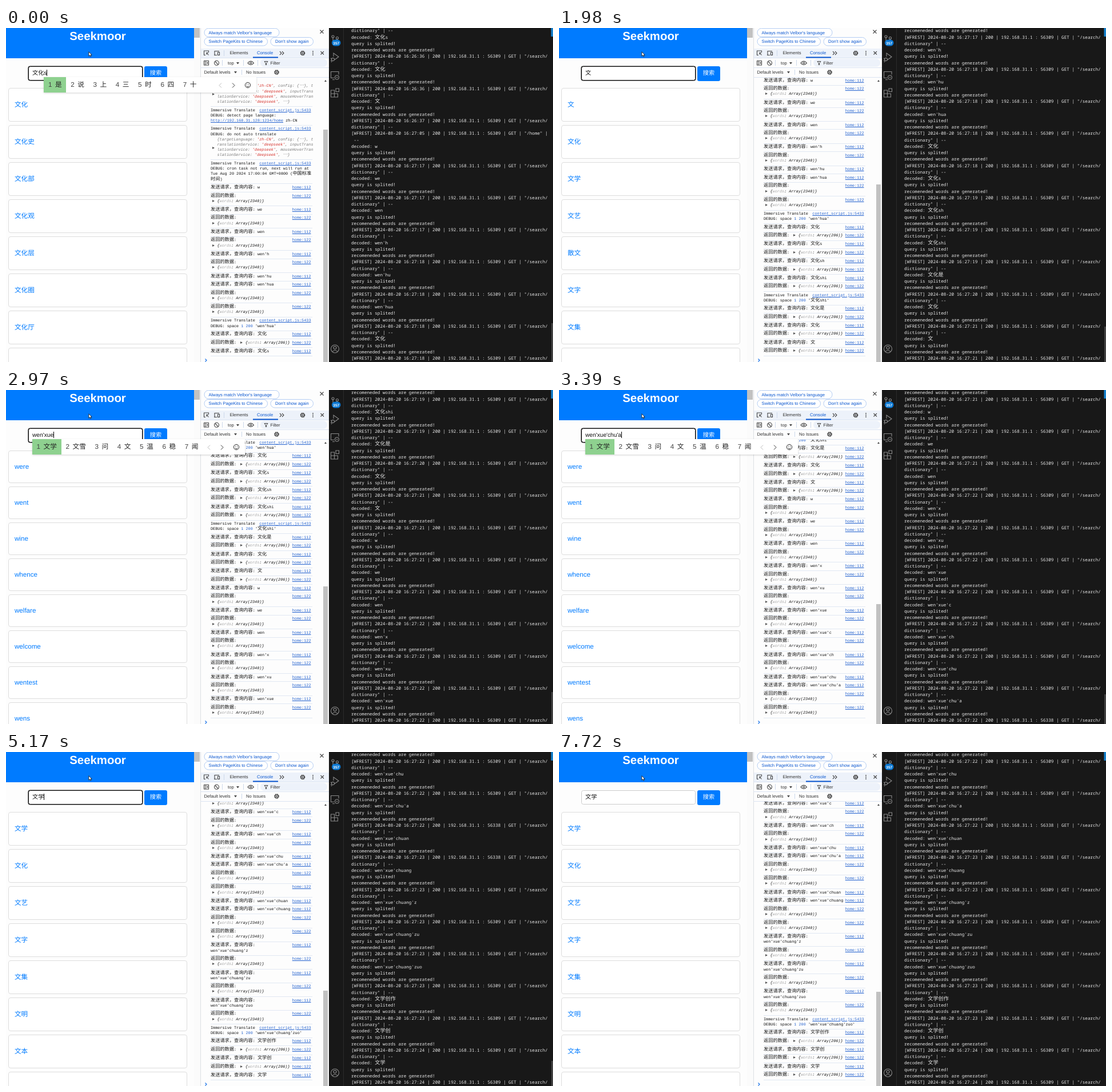
These frames come from a looping animation (957x585 px, 7740 ms). An HTML page:

```html
<!DOCTYPE html>
<html lang="zh-CN">
<head>
<meta charset="utf-8">
<title>Search suggestions</title>
<style>
html, body { margin: 0; width: 100%; height: 100%; overflow: hidden; background: #fdfdfd; }
body { position: relative; text-rendering: geometricPrecision; font-family: "Liberation Sans", "Noto Sans CJK SC", sans-serif; }
#page, #con, #term, #ime, svg, .abs { position: absolute; }
b { font-weight: 400; font-family: "Noto Sans CJK SC", "Noto Sans CJK", sans-serif; line-height: 0; }

#page { left: 0; top: 0; width: 340px; height: 585px; overflow: hidden; background: #fdfdfd; }
#tint { left: 4px; top: 53px; width: 336px; height: 532px; background: #f8f8f8; display: none; }
#head { left: 0; top: 0; width: 329px; height: 53px; background: #007bff; }
#title { left: -8px; width: 337px; top: 2px; font: 700 20.4px/26px "Liberation Sans", sans-serif; color: #fff; text-align: center; }
#bar { left: 329px; top: 0; width: 11px; height: 585px; background: #fbfbfb; }
#bar div { width: 10px; height: 17px; background: #c1c1c1; }
#box { box-sizing: border-box; left: 39px; top: 67px; width: 200px; height: 25px; border: 1px solid #ccc; border-radius: 3.5px; background: #fff; font-size: 10.2px; line-height: 23px; color: #111; padding-left: 6px; white-space: pre; }
#box.on { border-color: #111; box-shadow: 0 0 0 .6px #111; }
#caret { display: inline-block; width: 1px; height: 11px; background: #000; vertical-align: -2px; }
#go { left: 242px; top: 66.5px; width: 40px; height: 26px; border-radius: 3px; background: #007bff; color: #fff; font-size: 10.2px; line-height: 26px; text-align: center; }
.card { position: absolute; box-sizing: border-box; left: 4px; width: 312.5px; border: 1px solid #ddd; border-radius: 4px; background: #fff; color: #007bff; font-size: 11.6px; padding-left: 10px; }
.bare #tint { display: block; }
.bare #head { width: 340px; }
.bare #title { width: 348px; }
.bare #bar { display: none; }
.bare #box { left: 41px; width: 207px; }
.bare #go { left: 251px; }

#con { left: 340px; top: 87px; width: 225px; height: 498px; overflow: hidden; background: #fdfdfd; }
#con.bare { background: #f8f8f8; }
#rows { left: 18px; top: 0; width: 178px; height: 487.7px; display: flex; flex-direction: column; justify-content: flex-end; font: 6.833px/9.2px "Liberation Mono", monospace; color: #111; }
#rows b { font-size: 8.2px; font-weight: 300; }
.row { position: relative; flex: none; box-sizing: border-box; padding-top: 2.6px; border-bottom: 1px solid #e1e8f3; }
.row div { height: 9.2px; white-space: pre; }
.row a { position: absolute; right: 2.5px; color: #2563cf; }
.row a, u { text-decoration: underline; }
u, .num { color: #2563cf; }
.obj { display: inline-block; margin-left: 11.5px; font-style: italic; color: #777; }
.row em { color: #d5302a; }
.row i i { color: #aaa; }
.tri { display: inline-block; border: 2.3px solid transparent; border-left: 4px solid #555; border-right: 0; margin: 0 4.5px 0 3px; }
.obj .tri { position: absolute; left: 0; top: 37px; }
#thumb { left: 215px; width: 8px; background: #c1c1c1; }

#term { left: 565px; top: 0; width: 392px; height: 585px; background: #181818; overflow: hidden; }
#lines { left: 39px; top: .4px; font: 7.655px/11.255px "Noto Sans Mono", "DejaVu Sans Mono", monospace; color: #e8e8e8; }
#lines div { height: 11.255px; white-space: pre; }
#lines b { font-size: 9.19px; }
#slider { left: 389px; width: 3px; background: #424242; }

#ime { top: 85.5px; width: 372px; height: 27.5px; background: #fff; box-shadow: 0 1px 3px rgba(0, 0, 0, .18); display: flex; overflow: hidden; font-size: 11.7px; line-height: 28px; color: #222; white-space: pre; }
#ime div { box-sizing: border-box; flex: none; padding-left: 8px; }
#ime div:first-child { background: #8ed18f; }
#ime span { display: inline-block; width: 12px; color: #444; }
#ime svg { left: 300px; top: 0; }
#ui { left: 0; top: 0; }
</style>
</head>
<body>
<div id="page">
  <div id="tint" class="abs"></div>
  <div id="head" class="abs"></div>
  <div id="title" class="abs">Seekmoor</div>
  <div id="bar" class="abs"><div></div></div>
  <div id="box" class="abs"><span id="typed"></span><span id="caret"></span></div>
  <div id="go" class="abs">搜索</div>
  <div id="cards"></div>
</div>
<div id="con"><div id="rows" class="abs"></div><div id="thumb" class="abs"></div></div>
<div id="term"><div id="lines" class="abs"></div><div id="slider" class="abs"></div></div>
<svg id="ui" width="957" height="585" font-family="Liberation Sans, sans-serif" font-size="7.7" fill="#333">
  <rect x="340" width="225" height="87" fill="#fdfdfd"/>
  <rect x="340" y="36" width="225" height="16.5" fill="#edf2fa"/>
  <rect x="445" y="54" width="117" height="14" rx="7" fill="#edf2fa"/>
  <path d="M340.5 0V585" stroke="#dcdfe4"/>
  <path d="M340 52.5H565M340 69.5H565M340 86.5H565" stroke="#dbe4f3"/>
  <g fill="#fff" stroke="#b4cdf3">
    <rect x="347" y="0.5" width="131" height="15" rx="7.5"/>
    <rect x="347" y="16.5" width="110.5" height="14.5" rx="7.2"/>
    <rect x="463" y="16.5" width="74.5" height="14.5" rx="7.2"/>
  </g>
  <g fill="#0b57d0">
    <text x="354.5" y="11">Always match Velbor's language</text>
    <text x="354.5" y="26.3">Switch PageKits to Chinese</text>
    <text x="471" y="26.3">Don't show again</text>
    <text x="439" y="46.3">Console</text>
    <rect x="432" y="50.5" width="44" height="2"/>
  </g>
  <text x="391.5" y="46.3">Elements</text>
  <text x="388" y="64">top</text><text x="462.5" y="64">Filter</text>
  <text x="346.5" y="80.3">Default levels</text><text x="420" y="80.3">No Issues</text>
  <path d="M403 60h5l-2.5 3.5zM399 76h5l-2.5 3.5zM557 94h4l-2-3z" fill="#444"/>
  <path d="M452 58.5h6l-2.3 3v3h-1.4v-3z" fill="none" stroke="#444"/>
  <g fill="none" stroke="#444" stroke-width="1.1">
    <path d="M549.5 3.5l6 6m0-6l-6 6M550.5 41l5.5 5.5m0-5.5l-5.5 5.5M479 41l3 3-3 3M483 41l3 3-3 3"/>
    <path d="M349 47.5h-2.5v-7.5h8v2.5M354.5 47.5l-3.5-4m0 3v-3.3h3.3"/>
    <path d="M365 47v-6.5h8M364 47.5h5M370.5 42.5h3v5h-3z"/>
    <path d="M346.5 57.5h8v7.5h-8zM349 57.5v7.5M351 59.5l2 1.7-2 1.7"/>
    <circle cx="368.5" cy="61.3" r="4"/><path d="M365.7 58.5l5.6 5.6"/>
    <path d="M423 61.3q5-6.5 10.5 0q-5.5 6.5-10.5 0z"/><circle cx="428.2" cy="61.3" r="1.5"/>
    <g id="gear"><circle cx="519" cy="44" r="3.5" stroke-width="1.7" stroke-dasharray="1.9 .85"/><circle cx="519" cy="44" r="2.8"/><circle cx="519" cy="44" r=".8"/></g>
    <use href="#gear" x="-45.5" y="33.5"/>
  </g>
  <path d="M381.5 39v10M378.5 56v10M415.5 56v10M440.5 56v10M412.5 73v9" stroke="#cdd8ea"/>
  <g fill="#444"><circle cx="537" cy="41" r=".9"/><circle cx="537" cy="44" r=".9"/><circle cx="537" cy="47" r=".9"/></g>
  <path d="M348.5 579.5l2.5 2.5-2.5 2.5" fill="none" stroke="#1a73e8" stroke-width="1.2"/>
  <path d="M590.5 0V585" stroke="#2b2b2b"/>
  <rect x="953.5" width="3.5" height="15" fill="#1580cc"/>
  <g fill="none" stroke="#8a8a8a" stroke-width="1.1">
    <circle cx="572" cy="15" r="2"/><circle cx="579.5" cy="17.5" r="2"/><path d="M572 17v7M579.5 19.5q-1 3-7 2.5"/>
    <path d="M573 50v-6l9 6.5-7 5"/><circle cx="572" cy="55" r="2.5"/><path d="M568 53l2 1M568 57.5l2-1M569 60l1.5-2"/>
    <path d="M574 87.5h-5.5v-11h13.5v5M571 90.5h4"/><circle cx="579" cy="86.5" r="3.5"/><path d="M577.5 86.5h3"/>
    <path d="M568.5 109h6v6h-6zM568.5 115v6h6v-6M574.5 115h6v6h-6M577 106h5.5v5.5h-5.5z"/>
    <circle cx="575.5" cy="562" r="7"/><circle cx="575.5" cy="560" r="2.5"/><path d="M571 567q4.5-5 9 0"/>
  </g>
  <rect x="570" y="20.5" width="15.5" height="11" rx="5.5" fill="#0a78d4"/>
  <text x="577.7" y="28.6" font-size="6.5" font-weight="700" fill="#fff" text-anchor="middle">357</text>
</svg>
<div id="ime"></div>
<svg style="left:144px;top:41px" width="8" height="11"><path d="M.8.8v7.4l1.8-1.6 1.2 2.7 1.3-.6-1.2-2.6h2.3z" fill="#fff" stroke="#111" stroke-width=".8"/></svg>

<script>
const LOOP = 7740;
const el = id => document.getElementById(id);
const wide = s => s.replace(/[\u2e80-\uffef…]+/g, m => `<b>${m}</b>`);
const line = s => `<div>${s}</div>`;

// Queries grouped by the second they were answered in
const bySecond = [
  [17, "w we wen"],
  [18, "wen'h wen'hu wen'hua 文化"],
  [19, "文化s 文化sh 文化shi"],
  [20, "文化是"],
  [21, "文化 文 w we"],
  [22, "wen wen'x wen'xu wen'xue wen'xue'c wen'xue'ch wen'xue'chu wen'xue'chu'a"],
  [23, "wen'xue'chuan wen'xue'chuang wen'xue'chuang'z wen'xue'chuang'zu wen'xue'chuang'zuo 文学创作"],
  [24, "文学创 文学"]
];
const queries = bySecond.flatMap(([sec, list]) => list.split(" ").map(q => ({ q, sec })));

// Terminal
const access = (time, port, path) =>
  `[WFREST] 2024-08-20 ${time} | 200 | 192.168.31.1 : ${port} | GET | "/${path}`;
const answer = (q, time, port = 56309) => [
  "decoded: " + q, "query is splited!", "recomeneded words are generated!",
  access(time, port, "search/"), 'dictionary" | --'
];
const termLines = [
  ...answer("文化sh", "16:26:36"), ...answer("文化s", "16:26:36"),
  ...answer("文化", "16:26:36"), ...answer("文", "16:26:37"),
  access("16:27:05", 56309, 'home" |'), " --"
];
const intro = termLines.length;
for (const { q, sec } of queries)
  termLines.push(...answer(q, "16:27:" + sec, /chu'a$|chuan$/.test(q) ? 56338 : 56309));

// Console
const row = (lines, link, extra = 0) => {
  const h = 9.2 * lines.length + 5.3 + extra;
  return { h, html: `<div class="row" style="height:${h}px"><a>${link}</a>${wide(lines.map(line).join(""))}</div>` };
};
const debug = (...lines) => row(["Immersive Translate", ...lines], "content_script.js:5433");
const quoted = s => `<em>'${s}'</em>`;
const settings = [
  `<span class="tri"></span>{targetLanguage: ${quoted("zh-CN")}, config: {…}, t`,
  `ranslationService: ${quoted("deepseek")}, inputTrans`,
  `lationService: ${quoted("deepseek")}, mouseHoverTran`,
  `slationService: ${quoted("deepseek")}, …}`
].map(s => `<span class="obj">${s}</span>`);
const request = q => {
  const label = "发送请求，查询内容: ";
  return row(q.length > 14 ? [label, q] : [label + q], "home:112");
};
const response = q => {
  const latin = q[0] === "w";
  const data = `<span class="tri"></span><i>{<i>words</i>: Array(${latin ? 2340 : 206})}</i>`;
  return row(latin ? ["返回的数据:", data] : ["返回的数据: " + data], "home:122", .7);
};
const rows = [
  debug("DEBUG: user config", ...settings),
  debug("DEBUG: detect page language:", "<u>http://192.168.31.128:1234/home</u> zh-CN"),
  debug("DEBUG: do not auto translate", ...settings),
  debug("DEBUG: cron task not run, next will run at", "Tue Aug 20 2024 17:00:04 GMT+0800 (中国标准", "时间)")
];
let waiting = 0;
queries.forEach(({ q }, i) => {
  if ([6, 10, 28].includes(i))
    rows.push(debug(`DEBUG: space <span class="num">1 200</span> '${queries[i - 1].q}'`));
  rows.push(request(q));
  waiting++;
  if ([4, 21, 23].includes(i)) return;
  for (; waiting; waiting--) rows.push(response(q));
});

// Suggestions
const results = {
  none: "",
  culture: "文化 文化史 文化部 文化观 文化层 文化圈 文化厅",
  cultureShi: "文化 文化史 文化背景 文化观 文化遗产 文化部 文化氛围",
  wen: "文 文化 文学 文艺 散文 文字 文集",
  w: "w we who with was were will when",
  latin: "were went wine whence welfare welcome wentest wens",
  create: "文学 文作 文创 文艺 文集 文化 文本",
  letters: "文学 文化 文艺 文字 文集 文明 文本"
};
const candidates = {
  s: "是 说 上 三 时 四 十",
  sh: "是 上 说 时 谁 事 使",
  shi: "是 时 式 十 ⑩ X 使",
  w: "我 为 无 问 玩 外 王",
  we: "为 我 位 未 文 问 温",
  wen: "问 文 温 稳 闻 吻 纹"
};
const pick = part => candidates[part] ||
  (/zuo$/.test(part) ? "文学创作 文学 文雪 问 文 温" :
   /chuan/.test(part) ? "文学创 文学 文雪 问 文 温" : "文学 文雪 问 文 温 稳 闻");

// time, typed text, suggestions, console rows, answered queries
const steps = [
  [0, "文化s", "culture", 20, 7],
  [160, "文化sh", "cultureShi", 23, 9],
  [280, "文化shi", "cultureShi", 25, 10],
  [1290, "文化是", "cultureShi", 27, 10],
  [1440, "文化是", "cultureShi", 28, 11],
  [1590, "文化", "culture", 30, 12],
  [1860, "文", "none", 31, 12],
  [1980, "文", "wen", 32, 13],
  [2130, "", "none", 32, 13],
  [2274, "w", "w", 34, 14],
  [2418, "we", "w", 36, 15],
  [2562, "wen", "latin", 38, 16],
  [2706, "wen'x", "latin", 40, 17],
  [2850, "wen'xu", "latin", 42, 18],
  [2970, "wen'xue", "latin", 44, 19],
  [3120, "wen'xue'c", "latin", 46, 20],
  [3252, "wen'xue'chu", "latin", 49, 22],
  [3383, "wen'xue'chu'a", "latin", 52, 23],
  [3515, "wen'xue'chuang", "latin", 55, 25],
  [3647, "wen'xue'chuang'z", "latin", 58, 26],
  [3778, "wen'xue'chuang'zuo", "latin", 62, 28],
  [3910, "文学创作", "none", 64, 28],
  [4030, "文学创作", "create", 65, 29],
  [4460, "文学创", "create", 66, 29],
  [4620, "文学创", "letters", 67, 30],
  [5050, "文学", "letters", 68, 30],
  [5170, "文学", "letters", 68, 31],
  [5290, "文学", "letters", 69, 31]
];
const caretOff = [[710, 1290], [1980, 2130], [5600, 6130], [6720, LOOP]];

function drawCards(name) {
  const latin = name === "w" || name === "latin";
  const [top, pitch, h] = latin ? [105.5, 63, 57] : [105, 65, 59];
  const words = results[name] ? results[name].split(" ") : [];
  if (words.length === 7) words.push("");
  el("cards").innerHTML = words.map((w, i) =>
    `<div class="card" style="top:${top + pitch * i}px;height:${h}px;line-height:${h - 2}px">${w}</div>`).join("");
  el("page").className = el("con").className = words.length ? "" : "bare";
}

function drawIme(text) {
  const part = text.replace(/^[\u4e00-\u9fff]+/, "");
  const ime = el("ime");
  ime.style.display = part ? "flex" : "none";
  if (!part) return;
  ime.style.left = 45.5 + 10.2 * (text.length - part.length) + "px";
  ime.innerHTML = pick(part).split(" ").map((w, i) =>
    `<div style="width:${27.6 + 11.7 * w.length}px"><span>${i + 1}</span>${w}</div>`).join("") +
    `<svg width="72" height="28" fill="none" stroke="#333">
      <path d="M11 10.5l-4 4 4 4" stroke="#bbb"/><path d="M30 10.5l4 4-4 4"/>
      <circle cx="57" cy="14" r="4.7"/><path d="M54.5 15.5q2.5 3 5 0M55.3 11.7v1.5M58.7 11.7v1.5"/></svg>`;
}

function drawConsole(count) {
  const shown = rows.slice(0, count);
  el("rows").innerHTML = shown.slice(-40).map(r => r.html).join("");
  const len = 232600 / (shown.reduce((sum, r) => sum + r.h, 0) + 88);
  el("thumb").style.cssText = `top:${488 - len}px;height:${len + 10}px`;
}

function drawTerm(count) {
  const end = intro + 5 * count - 1;
  el("lines").innerHTML = wide(termLines.slice(end - 52, end).map(line).join(""));
  el("slider").style.top = 510 + count + "px";
  el("slider").style.height = 75 - count + "px";
}

let current;
function tick() {
  const t = performance.now() % LOOP;
  const step = steps.findLast(s => s[0] <= t);
  if (step !== current) {
    current = step;
    const [, text, list, shown, answered] = step;
    el("typed").textContent = text;
    drawCards(list);
    drawIme(text);
    drawConsole(shown);
    drawTerm(answered);
  }
  el("caret").style.opacity = caretOff.some(([a, b]) => t >= a && t < b) ? 0 : 1;
  el("box").classList.toggle("on", t < 7300);
  el("slider").style.opacity = t < 7720 ? 1 : 0;
  requestAnimationFrame(tick);
}
tick();
</script>
</body>
</html>
```
